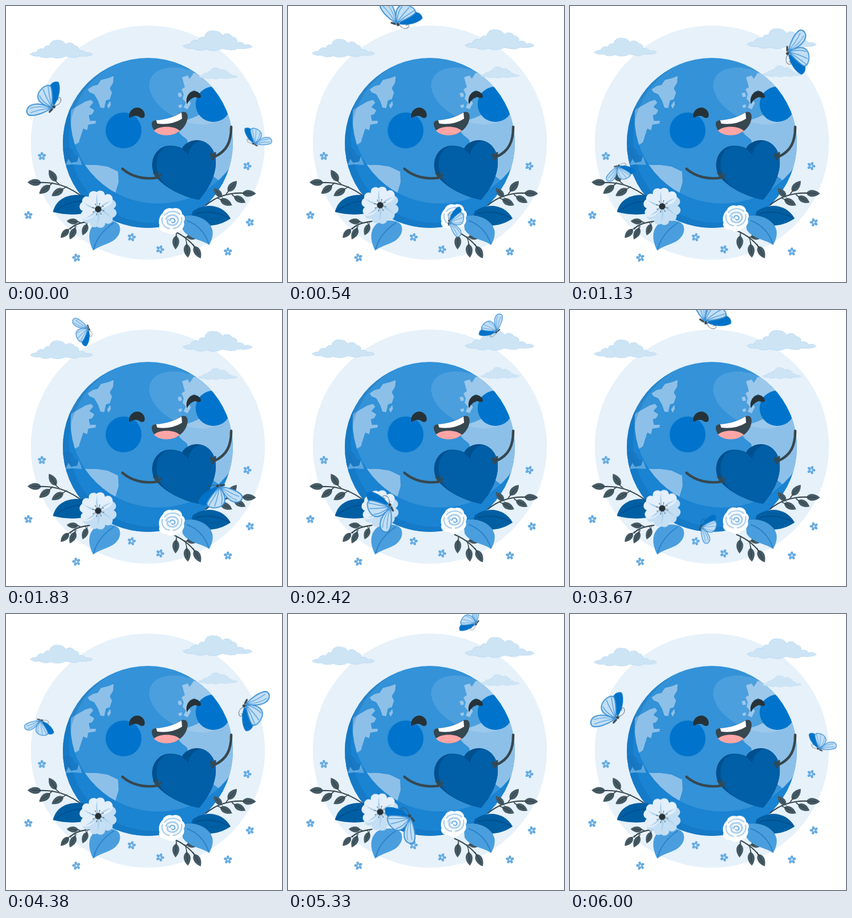
Write an HTML page without scripts that moves like this. It is 500 px wide and 500 px high and loops after 6.04 s.

```html
<!DOCTYPE html>
<html lang="en">
<head>
<meta charset="utf-8">
<title>Happy planet</title>
<style>
  html, body { margin: 0; width: 100%; height: 100%; overflow: hidden; background: #fff; }
  svg { display: block; width: 100%; height: 100%; }
  .cloud { animation: float 6040ms linear infinite; }
  .bloom { animation: float 1510ms linear infinite; }
  .orbit { transform-origin: 260px 196.5px; animation: orbit 6040ms linear infinite; }
  .line { fill: none; stroke-linecap: round; stroke-linejoin: round; }
  .land { fill: #8dc0e8; }
  .ink { fill: #37474f; }
  @keyframes float { 50% { transform: translateY(-10px); } }
  @keyframes orbit {
    0% { transform: rotate(-1deg); }
    49.67% { transform: rotate(360deg); }
    99.34% { transform: rotate(717.5deg); }
    100% { transform: rotate(719deg); }
  }
</style>
</head>
<body>
<svg viewBox="0 0 500 500" xmlns="http://www.w3.org/2000/svg">
  <defs>
    <clipPath id="globe"><circle cx="257" cy="248" r="154"/></clipPath>
    <mask id="low"><rect width="500" height="500" fill="#fff"/><ellipse cx="276" cy="203" rx="159" ry="155"/></mask>
    <mask id="rim"><rect width="500" height="500" fill="#fff"/><circle cx="266" cy="241" r="152"/></mask>

    <path id="cloud" fill="#cde4f5" stroke="#93c1e8" stroke-width=".7" stroke-dasharray="2 1.5" d="M44 87Q50 83 56 84C56 78 64 76 69 78C70 72 76 71 79 73C80 64 87 61 94 62C102 62 107 66 108 70C112 65 122 66 124 72C130 72 133 76 132 81C139 79 144 83 144 85Q153 83 157 88C150 92 140 91 133 91C125 96 115 92 108 91C98 96 88 95 82 92C72 96 65 93 60 91C52 92 46 90 44 87Z"/>

    <g id="leaf">
      <path fill="#455a64" d="M0 0C5 -8.500 16 -8 25 0C16 8 5 8.500 0 0Z"/>
      <path class="line" stroke="#263238" stroke-width=".8" d="M-4 0H18"/>
    </g>

    <ellipse id="dot" cx="0" cy="-4.6" rx="2.4" ry="3"/>
    <g id="tiny" fill="#67abe1">
      <use href="#dot"/>
      <use href="#dot" transform="rotate(72)"/>
      <use href="#dot" transform="rotate(144)"/>
      <use href="#dot" transform="rotate(216)"/>
      <use href="#dot" transform="rotate(288)"/>
      <circle r="2.4"/>
      <circle r="1.7" fill="#e6f1fa"/>
    </g>

    <path id="petal" d="M0 0C-17 -10 -22 -25 -13 -31C-8 -34 -4 -32 -1 -28C3 -36 12 -34 15 -28C19 -20 12 -8 0 0Z"/>
    <path id="fold" fill="#a9cfee" d="M0 0C-5 -9 -12 -17 -15 -25C-13 -15 -9 -6 0 0Z"/>
    <g id="stamen">
      <path class="line" stroke="#263238" stroke-width=".5" d="M0 0V-10"/>
      <circle cy="-10.500" r=".8" fill="#37474f"/>
    </g>

    <g id="butterfly">
      <path fill="#0072c8" d="M87 178C97 166 101 145 96 135C85 131 74 144 77 162Z"/>
      <g fill="#c2dff6" stroke="#3a8fd5" stroke-width="2" stroke-linejoin="round">
        <path d="M80 184C70 190 51 198 41 194C35 189 38 179 47 176C58 172 73 177 82 182Z"/>
        <path d="M84 181C69 178 54 169 59 156C63 146 76 137 82 143C86 155 84 169 84 181Z"/>
      </g>
      <path class="line" stroke="#3a8fd5" stroke-width="1.200" d="M83 180Q73 163 68 148M83 179Q79 162 77 143M82 180Q65 170 61 159M80 182Q60 177 44 182M79 183Q61 184 45 190"/>
      <path class="line" stroke="#37474f" stroke-width="3.200" d="M79 189L84 184"/>
      <circle class="ink" cx="87" cy="180" r="2.800"/>
      <path class="line" stroke="#37474f" stroke-width=".9" d="M89 178C97 177 102 170 99 164C97 161 93 164 95 168"/>
    </g>
  </defs>

  <rect width="500" height="500" fill="#fff"/>
  <circle cx="257" cy="247.5" r="212" fill="#e6f1fa"/>
  <g class="cloud">
    <use href="#cloud"/>
    <use href="#cloud" transform="translate(272.3 -23.6) scale(1.106)"/>
  </g>

  <!-- planet -->
  <g clip-path="url(#globe)">
    <circle cx="257" cy="248" r="155" fill="#3392d8"/>
    <g class="land">
      <path d="M148 151L157 145L166 143L172 134L184 131L195 127L194 139L188 149L192 157L188 169L181 171L178 185L171 184L167 172L160 160L151 156Z"/>
      <path d="M183 180L189 172L190 179L186 186Z"/>
      <path d="M110 193L130 181L144 173L154 170L158 175L151 183L160 189L156 196L150 198L152 208L163 208L162 213L149 215L147 225L140 222L136 234L132 247L124 252L108 240Z"/>
      <path d="M122 272L132 271L137 287L148 288L164 288L184 291L203 300L204 319L198 339L190 356L120 340Z"/>
      <path d="M319 129L329 126L333 132L340 121L360 125L395 165L350 160L341 152L333 157L328 166L335 176L329 187L322 184L326 175L320 168L322 160L318 151L324 147Z"/>
      <path d="M311 158L317 157L319 164L313 165ZM312 180L318 178L319 183L314 185Z"/>
      <path d="M325 207L340 202L355 195L400 185L420 190L418 280L393 322L365 300L335 268L328 242L318 234L311 226Z"/>
    </g>
    <ellipse cx="330" cy="163" rx="75" ry="45" transform="rotate(25 330 163)" fill="#fff" opacity=".12"/>
    <rect width="500" height="500" fill="#1a83d2" mask="url(#low)"/>
    <rect width="500" height="500" fill="#0a5fa8" opacity=".25" mask="url(#rim)"/>
    <path fill="#1b74bd" opacity=".6" d="M100 259L113 256L121 261L124 270L131 272L128 282L118 284L113 277L106 290Z"/>
    <path fill="#5aa6df" d="M108 288L113 277L118 284L129 282L132 272L138 288L121 287Z"/>
    <circle cx="213" cy="225.5" r="32.5" fill="#0074cc"/>
    <circle cx="375.5" cy="178" r="32" fill="#0074cc"/>
  </g>

  <!-- face -->
  <g fill="#263238">
    <path d="M223 201C222 191 230 184 238 184C246 184 253 192 251 200C249 204 245 203 243 202C239 198 230 198 224 203Z"/>
    <path d="M328 178C324 166 332 154 341 154C348 154 354 160 353 165C350 168 346 166 343 165C337 166 331 171 328 178Z"/>
  </g>
  <path class="ink" d="M264 214C264 208 268 207 274 207C292 206 305 200 317 193C324 190 329 193 329 201C328 220 311 233 294 234C277 235 265 226 264 214Z"/>
  <path fill="#fff" d="M272 207C290 206 304 201 318 193L319 204C305 213 290 215 274 213Z"/>
  <path fill="#ffa5a5" d="M268 226C277 217 303 216 315 226C307 232 300 234 294 234C284 235 274 232 268 226Z"/>

  <!-- heart and arms -->
  <path fill="#00508f" d="M350 351C320 346 284 328 269 306C257 281 272 253 297 253C306 253 314 255 319 258C323 249 335 243 346 243C366 243 382 262 380 287C378 315 363 335 350 351Z"/>
  <path fill="#005fa6" d="M350 351C322 346 287 330 276 306C267 281 277 254 300 253.500C313 254 324 261 330 270C332 257 341 247 353 244C370 248 382 265 380 287C378 315 363 335 350 351Z"/>
  <g class="line" stroke="#37474f" stroke-width="4.600">
    <path d="M211 295C227 309 250 315 274 311"/>
    <path d="M408 219C408 246 400 263 378 273"/>
    <path stroke-width="3.200" d="M272 309L268 302M273 309L275 301M274 310L280 306M275 311L279 312M378 272L371 268M378 272L371 273M378 273L374 278M378 272L379 266"/>
  </g>
  <g class="cloud"><use href="#cloud" transform="translate(321.7 73.6) scale(.62)"/></g>

  <!-- foliage -->
  <g class="line" stroke="#37474f" stroke-width="2.200">
    <path d="M140 347C115 327 90 318 60 320M152 390C139 392 125 394 116 404M362 361C382 344 404 338 430 339M302 407C322 415 340 431 344 441"/>
    <path stroke-width="1.300" d="M96 322L88 316M84 320L78 326M110 327L102 332M134 393L130 390M143 391L147 397M126 397L124 404M387 346L384 344M398 342L405 333M408 340L415 346M383 348L392 352M309 410L309 418M325 420L332 418M325 420L328 432"/>
  </g>
  <use href="#leaf" transform="translate(64 320) rotate(182)"/>
  <use href="#leaf" transform="translate(91 318) rotate(238)"/>
  <use href="#leaf" transform="translate(80 325) rotate(143)"/>
  <use href="#leaf" transform="translate(104 331) rotate(149)"/>
  <use href="#leaf" transform="translate(131 391) rotate(184) scale(.85)"/>
  <use href="#leaf" transform="translate(114 404) rotate(133) scale(.88)"/>
  <use href="#leaf" transform="translate(126 402) rotate(117) scale(.93)"/>
  <use href="#leaf" transform="translate(147 395) rotate(112) scale(.88)"/>
  <use href="#leaf" transform="translate(428 339) rotate(2)"/>
  <use href="#leaf" transform="translate(402 336) rotate(-50)"/>
  <use href="#leaf" transform="translate(413 345) rotate(28) scale(.95)"/>
  <use href="#leaf" transform="translate(388 350) rotate(27) scale(.97)"/>
  <use href="#leaf" transform="translate(391 346) rotate(228) scale(.88)"/>
  <use href="#leaf" transform="translate(327 418) rotate(-2) scale(.93)"/>
  <use href="#leaf" transform="translate(308 416) rotate(92)"/>
  <use href="#leaf" transform="translate(327 431) rotate(84)"/>
  <use href="#leaf" transform="translate(341 435) rotate(62)"/>

  <g fill="#005fa3">
    <path d="M85 373C91 349 112 339 142 343L150 374C130 379 106 379 85 373Z"/>
    <path d="M407 385C392 358 360 356 338 372L335 386C350 401 380 403 407 385Z"/>
  </g>
  <g fill="#4a9edd">
    <path d="M158 443C147 422 149 402 163 393C178 386 199 387 205 397C210 408 203 420 193 426C181 433 170 434 158 443Z"/>
    <path d="M318 382C340 374 369 386 374 406C376 417 372 425 368 433C355 423 330 422 320 405Z"/>
  </g>
  <g class="line" stroke-width="2">
    <path stroke="#004f8f" d="M88 372C104 359 121 353 145 353M404 384C386 374 364 370 344 376"/>
    <path stroke="#2a82cb" d="M159 440C164 421 177 405 195 393M367 430C361 411 347 396 328 389"/>
  </g>

  <use href="#tiny" transform="translate(65 272)"/>
  <use href="#tiny" transform="translate(437 290) rotate(20)"/>
  <use href="#tiny" transform="translate(40.500 379)"/>
  <use href="#tiny" transform="translate(442 392) rotate(-15)"/>
  <use href="#tiny" transform="translate(227.500 419) rotate(12)"/>
  <use href="#tiny" transform="translate(279 441) rotate(20)"/>
  <use href="#tiny" transform="translate(402 445)"/>
  <use href="#tiny" transform="translate(127.500 456) rotate(-12)"/>

  <!-- blossom -->
  <g class="bloom">
    <g transform="translate(167 368)">
      <g fill="#c4def3">
        <use href="#petal" transform="rotate(155)"/>
        <use href="#petal" transform="rotate(90)"/>
        <use href="#petal" transform="rotate(215)"/>
      </g>
      <g fill="#e3effa">
        <use href="#petal" transform="rotate(265)"/>
        <use href="#petal" transform="rotate(28)"/>
        <use href="#petal" transform="rotate(325)"/>
      </g>
      <use href="#fold" transform="rotate(28)"/>
      <use href="#fold" transform="rotate(90)"/>
      <use href="#fold" transform="rotate(155)"/>
      <use href="#fold" transform="rotate(215)"/>
      <use href="#fold" transform="rotate(265)"/>
      <use href="#fold" transform="rotate(325)"/>
      <use href="#stamen" transform="rotate(15)"/>
      <use href="#stamen" transform="rotate(60)"/>
      <use href="#stamen" transform="rotate(105)"/>
      <use href="#stamen" transform="rotate(150)"/>
      <use href="#stamen" transform="rotate(195)"/>
      <use href="#stamen" transform="rotate(240)"/>
      <use href="#stamen" transform="rotate(285)"/>
      <use href="#stamen" transform="rotate(330)"/>
      <circle r="5.800" fill="#263238"/>
    </g>

    <!-- rose -->
    <path fill="#fff" d="M284 375C287 367 295 365 302 367C310 364 319 369 319 377C325 380 325 387 322 391C325 399 319 406 312 408C306 415 295 415 291 410C282 411 275 404 278 397C275 389 279 379 284 375Z"/>
    <g class="line" stroke="#a9cfee" stroke-width="2.400">
      <path d="M287 379C293 371 307 370 315 377M318 383C320 394 313 402 303 403M283 384C281 394 287 402 296 403"/>
      <path stroke-width="3.200" d="M290 386C293 378 306 376 311 384C314 392 307 398 300 397C293 396 290 391 294 387"/>
      <path stroke="#67abe1" stroke-width="2" d="M297 389C297 384 304 383 306 388C307 392 302 394 300 391"/>
    </g>
  </g>

  <g class="orbit">
    <use href="#butterfly"/>
    <use href="#butterfly" transform="translate(447 252) rotate(-18) scale(-.68 .68) translate(-87 -180)"/>
  </g>
</svg>
</body>
</html>
```
